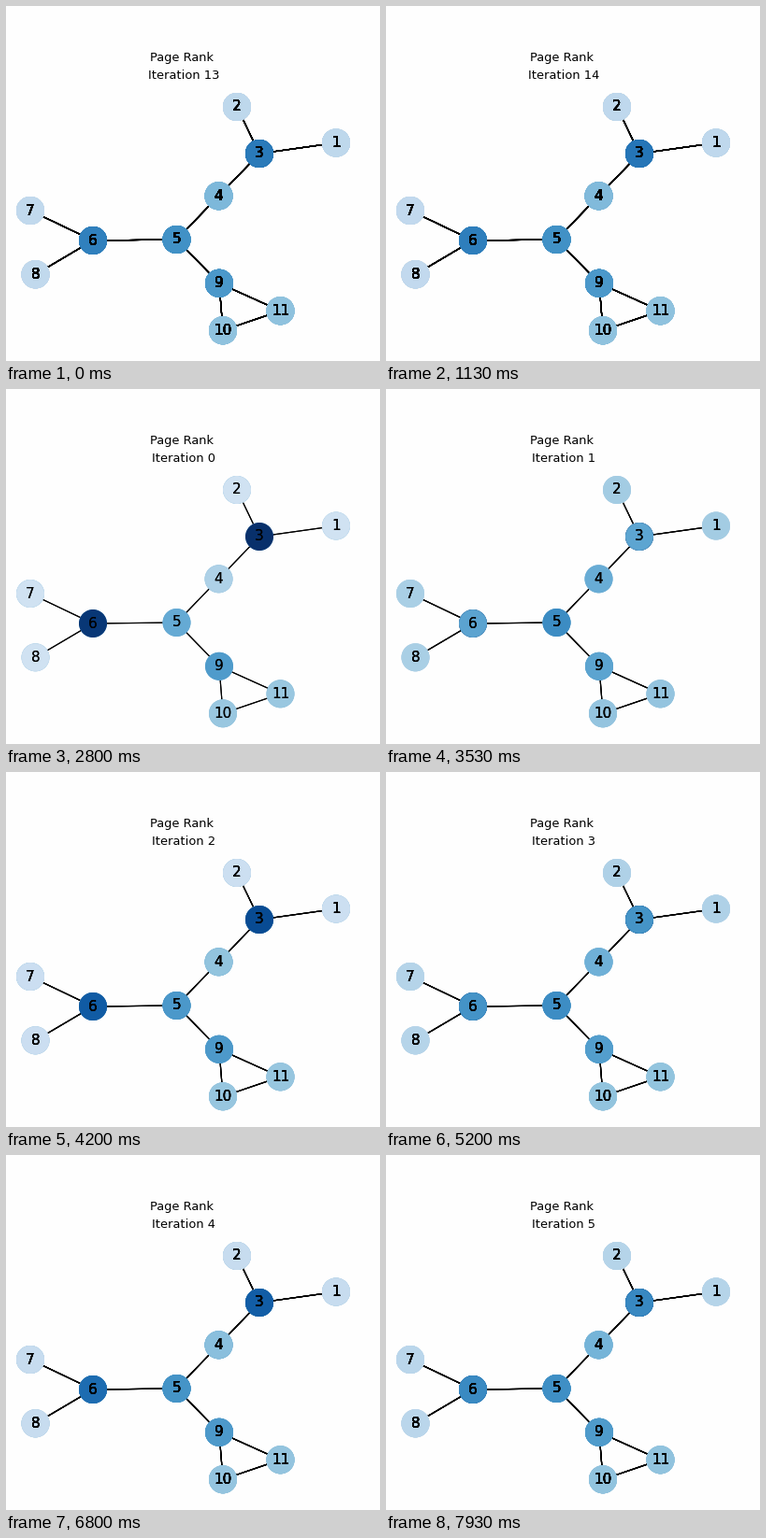
A matplotlib script that plays this animation: 400x380 px, repeating every 8 s.

```python
import numpy as np
import matplotlib.pyplot as plt
from matplotlib.animation import FuncAnimation
from matplotlib.collections import LineCollection

W, H, DPI = 400, 380, 100
FRAMES, LOOP = 120, 8000
HOLD = 15        # frames per iteration
STAGES = 16      # init, then iterations 0 to 14
PX = 72 / DPI    # one pixel in points

NODES = np.array([
    (353, 146.5), (247, 108), (271, 158), (227.5, 203.3), (182.5, 250),
    (93, 251), (26, 219), (31.5, 287.3), (228, 296.8), (232, 347.3),
    (293.5, 326.3),
])
EDGES = [(1, 3), (2, 3), (3, 4), (4, 5), (5, 6), (6, 7), (6, 8),
         (5, 9), (9, 10), (9, 11), (10, 11)]


def page_ranks(steps, damping=0.85):
    n = len(NODES)
    links = np.zeros((n, n))
    for a, b in EDGES:
        links[a - 1, b - 1] = links[b - 1, a - 1] = 1
    links /= links.sum(axis=0)
    ranks = [np.full(n, 1 / n)]
    for _ in range(steps - 1):
        ranks.append((1 - damping) / n + damping * links @ ranks[-1])
    return ranks


fig = plt.figure(figsize=(W / DPI, H / DPI), dpi=DPI, facecolor="#fefefe")
ax = fig.add_axes([0, 0, 1, 1])
ax.set_xlim(0, W)
ax.set_ylim(H, 0)
ax.axis("off")
plt.rcParams["font.family"] = "DejaVu Sans"


def title(x, y, text):
    return ax.text(x, y, text, fontsize=13 * PX, color="black",
                   ha="center", va="baseline")


def draw_graph(rank):
    """Add one copy of the graph; copies pile up as iterations go on."""
    lines = LineCollection([(NODES[a - 1], NODES[b - 1]) for a, b in EDGES],
                           colors="black", linewidths=1.15 * PX, zorder=1)
    ax.add_collection(lines)
    dots = ax.scatter(*NODES.T, s=(29 * PX) ** 2, c=rank, cmap="Blues",
                      vmin=0, vmax=0.2, linewidths=PX, zorder=2)
    labels = [ax.text(x, y, str(i), fontsize=15.2 * PX, color="black",
                      ha="center", va="center", zorder=3)
              for i, (x, y) in enumerate(NODES, 1)]
    return [lines, dots, *labels]


title(188, 59, "Page Rank")
caption = title(190, 78, "")
layers = [draw_graph(rank) for rank in page_ranks(STAGES)]


def update(frame):
    stage = ((frame + 12) // HOLD + 14) % STAGES
    caption.set_text(f"Iteration {stage - 1 if stage else 'init'}")
    for k, layer in enumerate(layers):
        for artist in layer:
            artist.set_visible(k <= stage)
    return []


anim = FuncAnimation(fig, update, frames=FRAMES, interval=LOOP / FRAMES,
                     init_func=lambda: update(0), repeat=True,
                     repeat_delay=0, blit=False)
plt.show()
```
